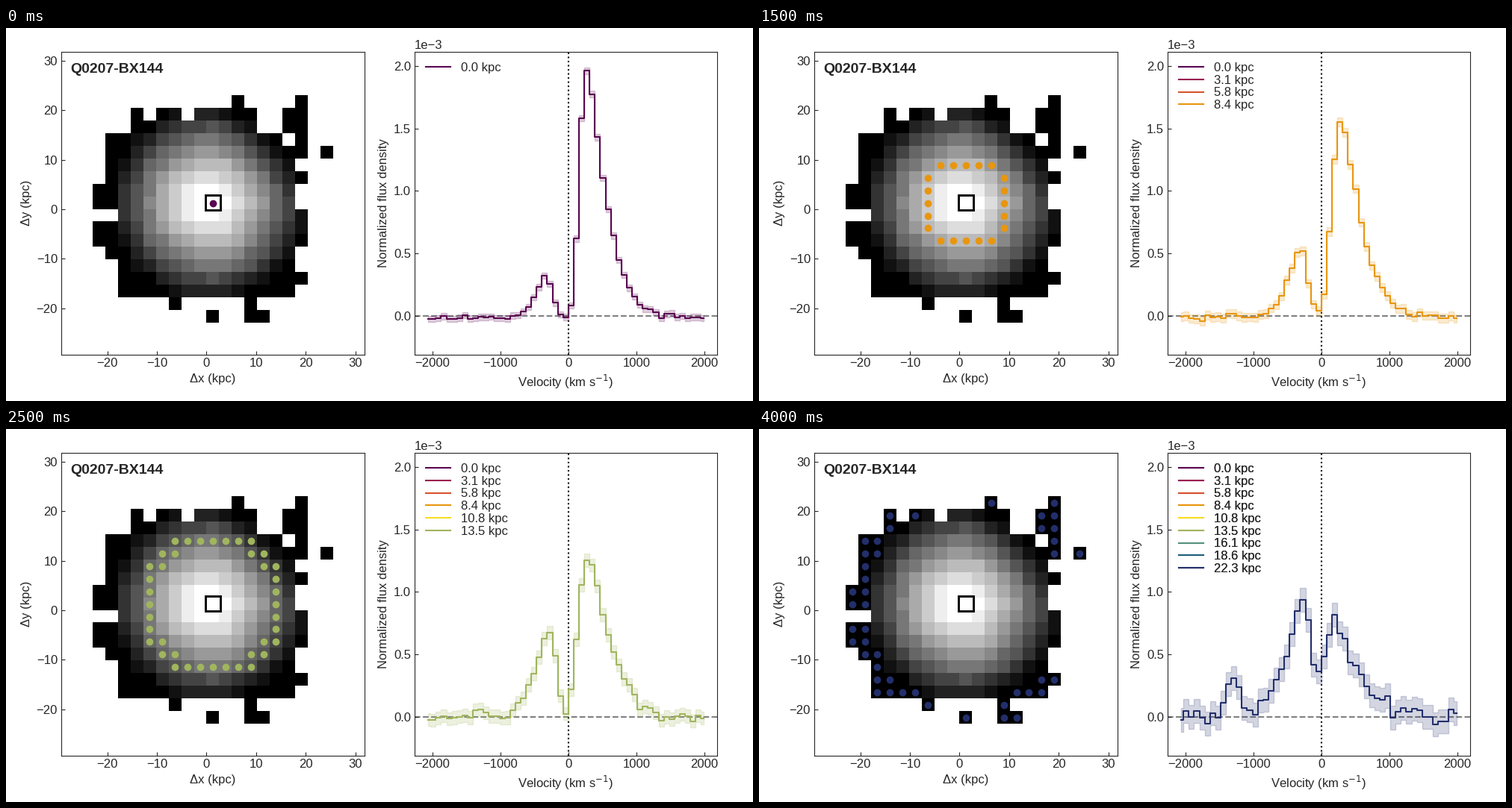
Recreate the animation shown at these times as a matplotlib script. Size 1000 by 500 pixels, loop 4.5 s.

```python
import numpy as np
import matplotlib.pyplot as plt
from matplotlib.animation import FuncAnimation
from matplotlib.patches import Rectangle

INK = "#262626"
plt.rcParams.update({
    "font.family": "Liberation Sans", "font.size": 12,
    "text.color": INK, "axes.labelcolor": INK, "axes.edgecolor": INK,
    "xtick.color": INK, "ytick.color": INK,
    "xtick.direction": "in", "ytick.direction": "in",
    "axes.linewidth": 0.8,
})

CELL = 2.548  # kpc per map cell
RADII = [0.0, 3.1, 5.8, 8.4, 10.8, 13.5, 16.1, 18.6, 22.3]
COLORS = ["#5a0550", "#9a1a52", "#d6532d", "#e8960f", "#f9dc24",
          "#a0b55e", "#56917c", "#1f607d", "#232f6b"]
LAST = len(RADII) - 1
BINS = np.arange(53)
VELOCITY = -2068 + 78.0 * BINS


def block(i0, i1, j0, j1):
    return {(i, j) for i in range(i0, i1 + 1) for j in range(j0, j1 + 1)}


def covered_cells():
    """A square body with ragged sides and a few stray cells."""
    body = block(-7, 6, -7, 6) - {(-7, 6), (4, 6), (5, 6), (6, 5)}
    left = block(-8, -8, -4, 5) - {(-8, -1)}
    left |= block(-9, -9, 0, 1) | block(-9, -9, -3, -2)
    right = block(7, 7, 4, 8) | block(7, 7, -3, -1) | block(6, 6, 6, 7)
    top = block(-1, 3, 7, 7) | block(-4, -3, 7, 7)
    bottom = block(3, 3, -9, -8) | {(4, -9), (0, -9), (-3, -8)}
    strays = {(-6, 7), (2, 8), (9, 4), (7, 2), (7, -6)}
    return sorted(body | left | right | top | bottom | strays)


def brightness(i, j):
    d = np.hypot(i + 0.3, j)
    v = 1.16 - 0.125 * d - 0.003 * d ** 2
    if i > 0 and j > 0:
        v -= 0.006 * i * j
    return np.round(np.clip(v, 0, 1) * 15) / 15


def ring_of(i, j):
    return min(int(np.hypot(i, j)), LAST)


def peak(height, centre, left, right, left_power, right_power):
    """Lopsided bell over the velocity bins."""
    d = BINS - centre
    fall = np.where(d < 0, (np.abs(d) / left) ** left_power,
                    (np.abs(d) / right) ** right_power)
    return height * np.exp(-fall)


def error(ring):
    return (2.5 + 0.11 * ring ** 2) * 1e-5


def spectrum(ring):
    """The red peak fades outwards while the blue one grows."""
    red = peak(np.interp(ring, [0, 7, 8], [197, 102, 73]),
               np.interp(ring, [0, 5, 8], [30.2, 30.6, 29.5]),
               2.1 + 0.17 * ring, 4.4 + 0.09 * ring, 2.8, 1.33)
    blue = peak(33 + 8.1 * ring, 22 + 0.1 * ring,
                2.3 + 0.2 * ring, 2 + 0.03 * ring, 1.3, 2.2)
    bump = peak(0.055 * ring ** 3, 10, 2, 2, 2, 2)
    noise = np.random.default_rng(40 + ring).normal(0, 0.45, BINS.size)
    return (red + blue + bump - 1) * 1e-5 + noise * error(ring)


def pixel_axes(x0, y0, x1, y1):
    return fig.add_axes([x0 / 1000, 1 - y1 / 500, (x1 - x0) / 1000, (y1 - y0) / 500])


fig = plt.figure(figsize=(10, 5), dpi=100, facecolor="white")

# Brightness map
CELLS = covered_cells()
sky = pixel_axes(73.9, 31.7, 479.9, 437.6)
grid = np.full((18, 19), np.nan)
for i, j in CELLS:
    grid[j + 9, i + 9] = brightness(i, j)
sky.imshow(grid, cmap="gray", vmin=0, vmax=1, origin="lower", aspect="auto",
           interpolation="nearest",
           extent=[-9 * CELL, 10 * CELL, -9 * CELL, 9 * CELL])
sky.set(xlim=(-11.5 * CELL, 12.5 * CELL), ylim=(-11.5 * CELL, 12.5 * CELL),
        xticks=range(-20, 31, 10), yticks=range(-20, 31, 10),
        xlabel="Δx (kpc)", ylabel="Δy (kpc)")
dots, = sky.plot([], [], "o", ms=7, mew=0, zorder=4)

# Spectrum
spec = pixel_axes(546.9, 31.7, 951.9, 437.6)
spec.set(xlim=(-2264, 2186), ylim=(-0.3065e-3, 2.1135e-3),
         xticks=range(-2000, 2001, 1000), yticks=np.arange(5) * 0.5e-3,
         xlabel="Velocity (km s$^{-1}$)", ylabel="Normalized flux density")
spec.ticklabel_format(axis="y", style="sci", scilimits=(0, 0))
spec.axhline(0, color="gray", ls="--", lw=1.5, zorder=1)
spec.axvline(0, color="black", ls=":", lw=1.5, zorder=1.5)

curves = []
for ring, color in enumerate(COLORS):
    flux, err = spectrum(ring), error(ring)
    band = spec.fill_between(VELOCITY, flux - err, flux + err, step="mid",
                             color=color, alpha=0.2, zorder=2)
    line, = spec.step(VELOCITY, flux, where="mid", color=color, lw=1.5, zorder=3)
    curves.append((band, line))

# Title, centre marker and legend in stage pixels
stage = fig.add_axes([0, 0, 1, 1])
stage.set(xlim=(0, 1000), ylim=(500, 0))
stage.axis("off")
stage.text(86.2, 60, "Q0207-BX144", fontsize=14, weight="bold")
stage.add_patch(Rectangle((267.4, 224.2), 20, 20, fill=False, ec="black", lw=2.1))


def legend_row(n):
    y = 52.3 + 16.7 * n
    key, = stage.plot([562, 595], [y, y], color=COLORS[n], lw=1.5)
    label = stage.text(608.7, y + 5.8, f"{RADII[n]:.1f} kpc")
    return key, label


legend = [legend_row(n) for n in range(LAST + 1)]
legend_again = [legend_row(n) for n in range(LAST + 1)]  # darkens the final legend


def show(artists, on):
    for artist in artists:
        artist.set_visible(on)


def update(frame):
    ring = frame % (LAST + 1)
    picked = [(i, j) for i, j in CELLS if ring_of(i, j) == ring]
    x, y = (np.array(picked).T + 0.5) * CELL
    dots.set_data(x, y)
    dots.set_color(COLORS[ring])
    for n in range(LAST + 1):
        show(curves[n], n == ring)
        show(legend[n], n <= ring)
        show(legend_again[n], ring == LAST)
    return []


anim = FuncAnimation(fig, update, frames=LAST + 1, init_func=lambda: update(0),
                     interval=500, repeat=True, repeat_delay=0, blit=False)
plt.show()
```
